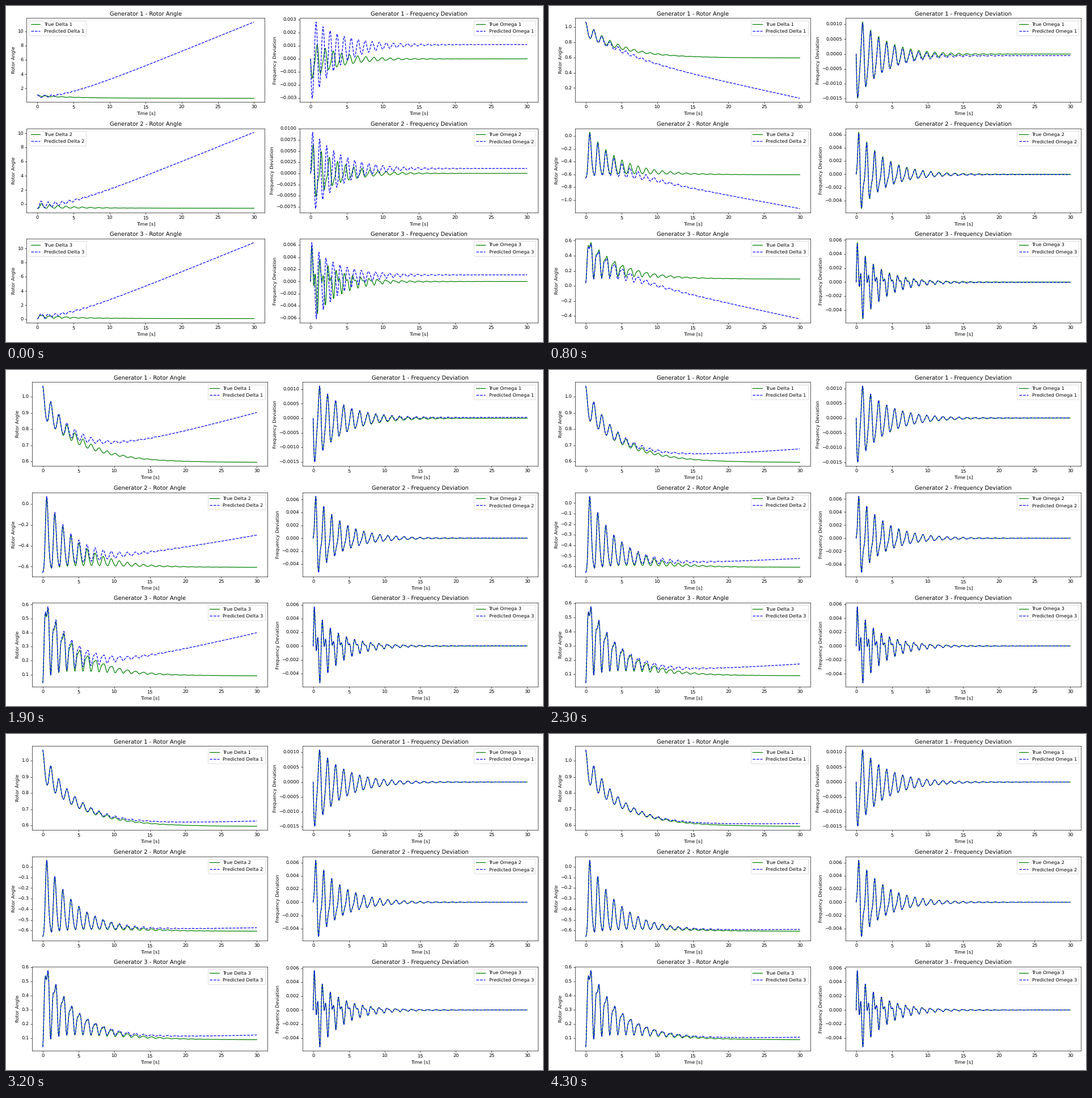
A matplotlib script that plays this animation: 947x592 px, repeating every 9300 ms.

```python
import numpy as np
import matplotlib.pyplot as plt
from matplotlib.animation import FuncAnimation

DPI = 59.1875
LAYOUT_DPI = 100    # margins are measured at this finer resolution
STEPS = 44          # training snapshots, the last one is held
FRAMES = 93
SYNC = 2 * np.pi * 60
t = np.linspace(0, 30, 1501)

# one value per generator: start and rest angles, swing, harmonic, quick settling
START = np.array([1.067, -0.657, 0.04])
REST = np.array([0.594, -0.607, 0.09])
SWING = np.array([0.094, -0.388, -0.257])
HARM = np.array([0.01, 0.077, -0.115])
KICK = np.array([-0.005, -0.053, -0.02])
UNTRAINED = np.array([0.18, -0.53, -0.34])

# predicted angle error at 30 s for a few snapshots
ERROR_STEPS = [0, 5, 12, 19, 28, 37, 43]
ERRORS = [10.75, -1.774, 0.073, 0.308, -0.018, 0.055, 0.017]

plt.rcParams.update({"font.family": "DejaVu Sans", "text.hinting": "none"})


def settle(rate):
    return 1 - np.exp(-rate * t)


def simulate(swing=SWING, harm=HARM, freq=5.57, error=0.0):
    """Rotor angles and frequency deviations of the three generators."""
    x = freq * t - 0.18 * settle(3)
    slow = START - REST - swing - harm - KICK
    modes = [(slow, np.exp(-0.2 * t)),
             (swing, np.exp(-0.255 * t) * np.cos(x)),
             (harm, np.exp(-0.33 * t) * np.cos(2 * x + 0.7 * settle(1.5))),
             (KICK, np.exp(-3 * t))]
    drift = error / 26 * (t - 4 * settle(0.25))
    delta = REST[:, None] + drift + sum(np.outer(a, m) for a, m in modes)
    omega = np.gradient(delta, t, axis=1, edge_order=2) / SYNC
    return delta, omega * settle(30)


def angle_error(step):
    """Ease out from one key to the next."""
    j = max(1, int(np.searchsorted(ERROR_STEPS, step)))
    a, b = ERROR_STEPS[j - 1:j + 1]
    left = (b - step) / (b - a)
    return ERRORS[j] + (ERRORS[j - 1] - ERRORS[j]) * left ** 2


def predict(step):
    error = angle_error(step)
    ring = np.exp(-(step / 4.8) ** 2) * np.cos(np.pi * step / 5)
    gain = 1 + 0.07 * np.tanh(error)
    swing = gain * (SWING + ring ** 3 * (UNTRAINED - SWING))
    harm = gain * HARM * (1 - 0.5 * ring ** 2)
    return simulate(swing, harm, 5.57 + 0.88 * ring, error)


fig, axes = plt.subplots(3, 2, figsize=(16, 592.01 / DPI), dpi=DPI)
truth = simulate()
lines = {}

COLUMNS = [("Rotor Angle", "Delta"), ("Frequency Deviation", "Omega")]
for col, (name, symbol) in enumerate(COLUMNS):
    for g in range(3):
        ax = axes[g, col]
        ax.plot(t, truth[col][g], "g-", label=f"True {symbol} {g + 1}")
        lines[g, col], = ax.plot(t, truth[col][g], "b--",
                                 label=f"Predicted {symbol} {g + 1}")
        ax.set_title(f"Generator {g + 1} - {name}")
        ax.set_xlabel("Time [s]")
        ax.set_ylabel(name)
        ax.legend(loc="best")

layouts = {}


def fit_layout():
    """Tight margins, worked out once for each set of tick labels."""
    key = tuple(tuple(np.round(ax.get_yticks(), 6)) for ax in axes.flat)
    if key not in layouts:
        dpi = fig.dpi
        fig.set_dpi(LAYOUT_DPI)
        fig.tight_layout()
        fig.set_dpi(dpi)
        p = fig.subplotpars
        layouts[key] = dict(left=p.left, right=p.right, top=p.top,
                            bottom=p.bottom, wspace=p.wspace, hspace=p.hspace)
    fig.subplots_adjust(**layouts[key])


def update(i):
    curves = predict(min(i, STEPS - 1))
    for (g, col), line in lines.items():
        line.set_ydata(curves[col][g])
        line.axes.relim()
        line.axes.autoscale_view()
    fit_layout()
    return list(lines.values())


def init():
    return update(0)


anim = FuncAnimation(fig, update, frames=FRAMES, init_func=init,
                     interval=100, repeat=True, repeat_delay=0, blit=False)
plt.show()
```
